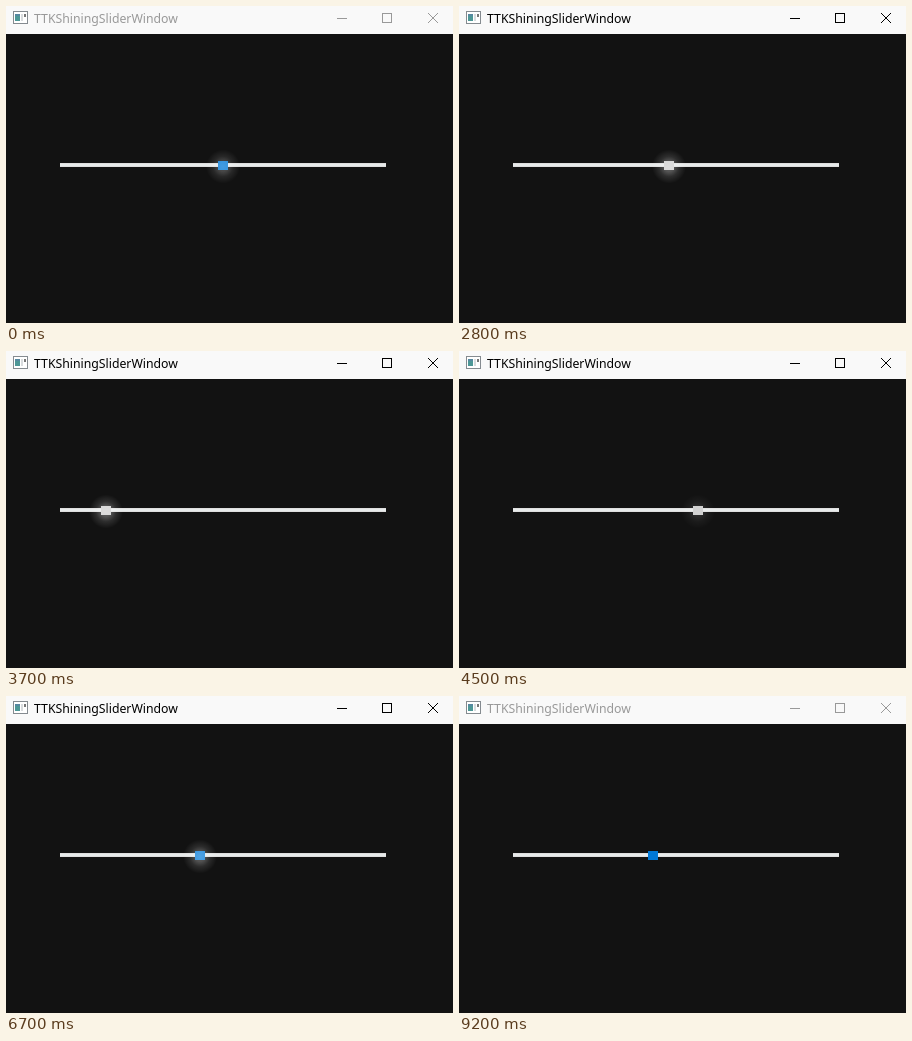
An HTML page for the animation above (9300 ms loop, 447 by 317 pixels).

```html
<!DOCTYPE html>
<html lang="en">
<head>
<meta charset="utf-8">
<title>TTKShiningSliderWindow</title>
<style>
  html, body { margin: 0; width: 100%; height: 100%; overflow: hidden; background: #121212; }
  svg { display: block; }
  text { font: 12.27px "Noto Sans", "Open Sans", sans-serif; }
</style>
</head>
<body>
<svg width="447" height="317" viewBox="0 0 447 317">
  <defs>
    <radialGradient id="glow">
      <stop offset="0" stop-color="#fff" stop-opacity=".38"/>
      <stop offset=".3" stop-color="#fff" stop-opacity=".32"/>
      <stop offset=".6" stop-color="#fff" stop-opacity=".13"/>
      <stop offset="1" stop-color="#fff" stop-opacity="0"/>
    </radialGradient>
  </defs>
  <rect width="447" height="317" fill="#121212"/>
  <rect width="447" height="28" fill="#f9f9f9"/>

  <g shape-rendering="crispEdges">
    <rect x="7.5" y="5.5" width="14" height="12" fill="#fff" stroke="#858b90"/>
    <rect x="9" y="8" width="5" height="7" fill="#4d9796"/>
    <rect x="9" y="8" width="5" height="2" fill="#5688a0"/>
    <rect x="15" y="8" width="2" height="7" fill="#d9dcde"/>
    <rect x="18" y="8" width="2" height="3" fill="#777"/>
  </g>

  <text id="title" x="28" y="17">TTKShiningSliderWindow</text>
  <g id="buttons" fill="none">
    <path d="M331 12.5h10M376.5 7.5h9v9h-9z" shape-rendering="crispEdges"/>
    <path d="M422 7l10 10M432 7l-10 10"/>
  </g>

  <rect x="54" y="157" width="326" height="4" fill="#e7eaea"/>
  <path d="M54 157.5h326M54 160.5h326" stroke="#dedede"/>
  <g id="knob">
    <rect id="handle" x="-5" y="-5" width="10" height="9"/>
    <circle id="shine" cy=".5" r="17" fill="url(#glow)"/>
  </g>
</svg>
<script>
const LOOP = 9300, STEP = 100;
const $ = id => document.getElementById(id);
const title = $('title'), buttons = $('buttons'), knob = $('knob'),
      handle = $('handle'), shine = $('shine');

// drag path: [ms, handle centre]
const path = [
  [2200, 217], [2800, 210], [3300, 207], [3500, 172], [3700, 100],
  [3900, 71], [4000, 71], [4200, 128], [4400, 204], [4500, 239],
  [4700, 322], [4900, 364], [5000, 368], [5300, 340], [5500, 257],
  [5600, 232], [5800, 206], [6200, 195], [6500, 194]
];

const slope = i => (path[i + 1][1] - path[i][1]) / (path[i + 1][0] - path[i][0]);

// harmonic mean of neighbouring slopes, so the curve never overshoots
function tangent(i) {
  if (i === 0 || i === path.length - 1) return 0;
  const a = slope(i - 1), b = slope(i);
  return a * b <= 0 ? 0 : 2 * a * b / (a + b);
}

function position(t) {
  const last = path.length - 1;
  if (t <= path[0][0]) return path[0][1];
  if (t >= path[last][0]) return path[last][1];
  const i = path.findIndex(p => p[0] > t) - 1;
  const [t0, x0] = path[i], [t1, x1] = path[i + 1];
  const d = t1 - t0, u = (t - t0) / d, v = 1 - u;
  return x0 * v * v * (1 + 2 * u) + x1 * u * u * (3 - 2 * u)
    + d * u * v * (v * tangent(i) - u * tangent(i + 1));
}

const pulse = t => (1 - Math.cos((t - 1250) / 4000 * 2 * Math.PI)) / 2;

function draw(ms) {
  let t = Math.floor(ms % LOOP / STEP) * STEP;
  if (t < 300) t = 0;
  const active = t >= 2300 && t < 9200;
  const pressed = t >= 2300 && t < 6500;
  title.setAttribute('fill', active ? '#000' : '#999');
  buttons.setAttribute('stroke', active ? '#000' : '#999');
  handle.setAttribute('fill', pressed ? '#ccc' : '#0078d7');
  knob.setAttribute('transform', `translate(${Math.round(position(t))} 160)`);
  shine.setAttribute('opacity', pulse(t).toFixed(3));
}

const start = performance.now();
function tick() {
  draw(performance.now() - start);
  requestAnimationFrame(tick);
}
tick();
</script>
</body>
</html>
```
